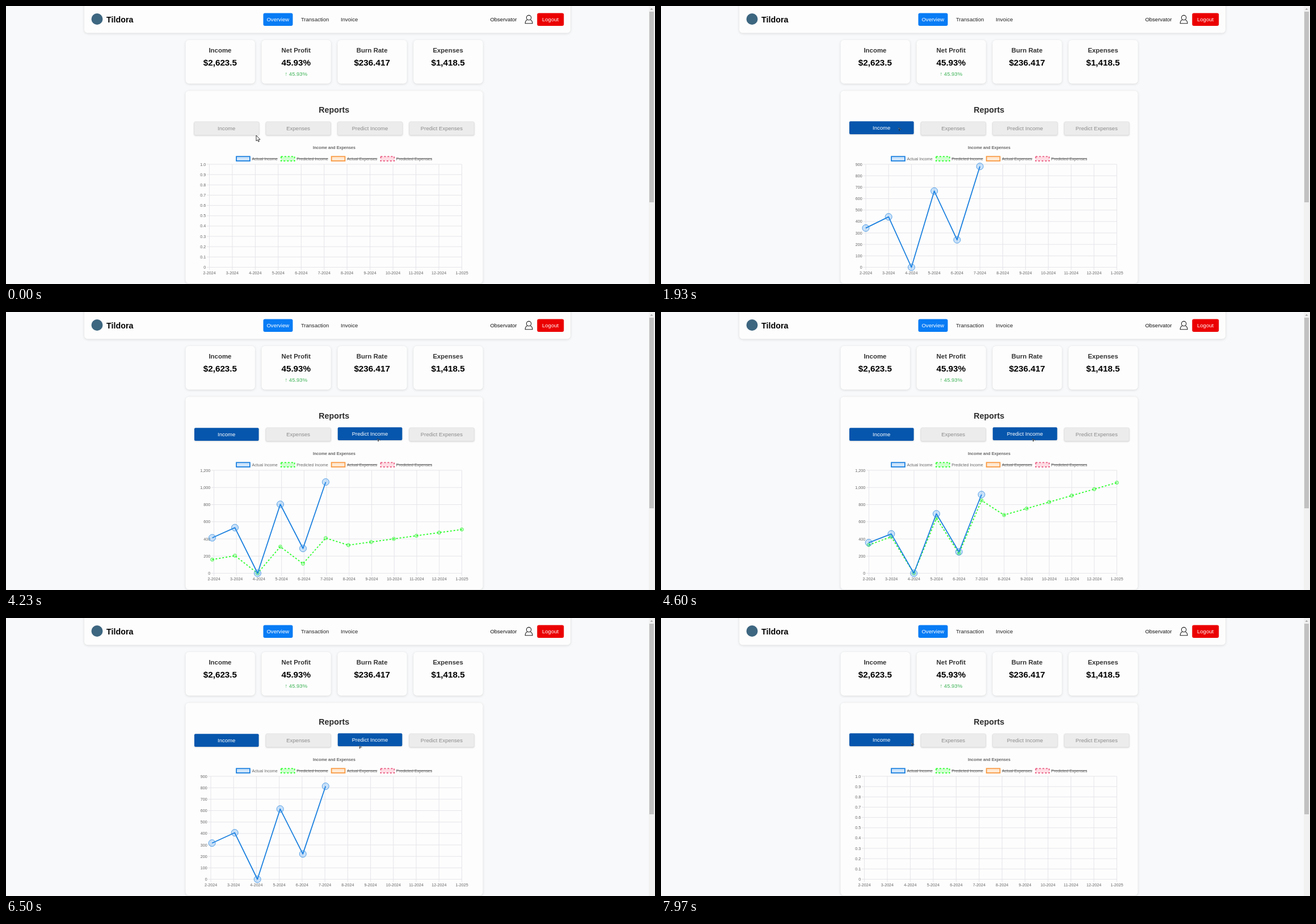
An HTML page that plays this animation: 1144x490 px, repeating every 8000 ms.

```html
<!DOCTYPE html>
<html lang="en">
<head>
<meta charset="utf-8">
<title>Finance overview</title>
<style>
html, body { margin: 0; width: 100%; height: 100%; overflow: hidden; background: #f8f9fa; }
svg { display: block; width: 1144px; height: 490px; font: 9.53px "Liberation Sans", Arial, sans-serif; }
.card { fill: #fdfdfd; filter: drop-shadow(0 1.5px 2px rgba(0, 0, 0, .13)); }
.mid { text-anchor: middle; }
.end { text-anchor: end; }
.bold { font-weight: bold; }
.small { font-size: 7.15px; fill: #666; }
.grid { stroke: #e5e5ea; fill: none; }
.btn { filter: drop-shadow(0 1.2px 1.2px rgba(0, 0, 0, .16)); }
</style>
</head>
<body>
<svg viewBox="0 0 1144 490">
  <rect class="card" x="138" y="-10" width="857" height="57.5" rx="6"/>
  <circle cx="160.5" cy="23" r="10" fill="#3d6680"/>
  <text class="bold" x="177" y="28.5" font-size="14.3">Tildora</text>
  <rect x="453.5" y="12.5" width="52" height="22.5" rx="3" fill="#087cf5"/>
  <text class="mid" x="479.3" y="27" fill="#fff">Overview</text>
  <text class="mid" x="544.6" y="27" fill="#222">Transaction</text>
  <text class="mid" x="605.2" y="27" fill="#222">Invoice</text>
  <text class="end" x="900.5" y="27" fill="#111">Observator</text>
  <g fill="none" stroke="#222" stroke-width="1.1">
    <circle cx="921.6" cy="20.6" r="4.2"/>
    <path d="M918.8 24.2Q915.2 26 915.2 30.7H928Q928 26 924.4 24.2"/>
  </g>
  <rect x="936.3" y="12.5" width="47" height="22.5" rx="3" fill="#eb0000"/>
  <text class="mid" x="959.6" y="27" fill="#fff">Logout</text>
  <g id="cards"></g>
  <rect class="card" x="316.5" y="149.5" width="524" height="339.5" rx="6"/>
  <text class="mid bold" x="578.3" y="188" font-size="14.3" fill="#2b2b2b">Reports</text>
  <text class="mid bold small" x="578.5" y="251.8">Income and Expenses</text>
  <g id="buttons"></g>
  <g id="legend"></g>
  <g id="chart"></g>
  <rect x="1133" width="11" height="490" fill="#f1f1f1"/>
  <rect x="1134" y="10" width="8" height="336" fill="#c1c1c1"/>
  <path d="M1135.5 6.5L1138 4L1140.5 6.5Z" fill="#999"/>
  <g id="cursor" fill="#fff" stroke="#222" stroke-width=".9" stroke-linejoin="round">
    <path id="arrow" d="M0 0V10L2.3 7.9L3.9 11.3L5.4 10.6L3.9 7.3H7Z"/>
    <path id="hand" d="M-1.1 1Q0-.7 1.1 1V5.2Q2-.1+4.8 3.2 5.6Q4.3 5 5 6.2Q6.3 5.7 6.3 7.4V10Q6.2 12 5 13.6H-.8Q-1.5 11.7-3.6 9.2Q-4.2 7.7-2.8 7.7L-1.1 9Z"/>
  </g>
</svg>
<script>
const LOOP = 8000, TOP = 279, BOTTOM = 460.5, RIGHT = 803.5, GROW = 1000, FADE = 200;
const $ = id => document.getElementById(id);
const lerp = (a, b, k) => a + (b - a) * k;
const clamp = v => Math.max(0, Math.min(1, v));

const actual = [350, 450, 0, 680, 245, 900];
const predicted = [...actual, 720, 800, 880, 960, 1040, 1120];
const months = predicted.map((_, i) => i < 11 ? `${i + 2}-2024` : '1-2025');

// Chart layouts, each starting with a click
const views = [
  { at: 0, left: 358.5, max: 1, rows: 10 },
  { at: 1310, left: 361, max: 900, rows: 9, income: true },
  { at: 4090, left: 366.5, max: 1200, rows: 6, income: true, forecast: true },
  { at: 6290, left: 361, max: 900, rows: 9, income: true },
  { at: 7700, left: 358.5, max: 1, rows: 10 }
];
const viewIndex = t => Math.max(0, views.findLastIndex(v => v.at <= t));

// Pointer stops: time, x, y
const stops = [
  [450, 441, 228], [950, 419, 214.5], [2050, 419, 214.5], [2700, 494.5, 179],
  [3250, 494.5, 179], [3850, 655, 223], [5700, 655, 223], [6150, 622.5, 225],
  [6700, 622.5, 225], [7400, 441.5, 220]
];
function pointer(t) {
  const i = stops.findIndex(s => s[0] > t);
  if (i === 0) return stops[0].slice(1);
  if (i < 0) return stops.at(-1).slice(1);
  const [t0, x0, y0] = stops[i - 1], [t1, x1, y1] = stops[i];
  let k = (t - t0) / (t1 - t0);
  k = k * k * (3 - 2 * k);
  return [lerp(x0, x1, k), lerp(y0, y1, k)];
}

const buttons = ['Income', 'Expenses', 'Predict Income', 'Predict Expenses']
  .map((label, i) => ({ label, x: 331.3 + 126.4 * i, key: ['income', '', 'forecast', ''][i] }));
function hovers(b, t) {
  const [x, y] = pointer(t);
  return x > b.x && x < b.x + 115 && y > 204 && y < 228;
}

// Share of the last FADE ms in which a condition held, as in a linear transition
function recent(test, t) {
  let n = 0;
  for (let i = 0; i < 10; i++) n += test(Math.max(0, t - FADE * i / 10)) ? 1 : 0;
  return n / 10;
}

function drawButtons(t) {
  $('buttons').innerHTML = buttons.map(b => {
    const lift = recent(u => hovers(b, u), t);
    const on = recent(u => hovers(b, u) || views[viewIndex(u)][b.key], t);
    const mid = b.x + 57.4;
    return `<g class="btn" transform="translate(0 ${-lift})">
      <g opacity="${1 - on}"><rect x="${b.x + .4}" y="204" width="114.4" height="23.6" rx="2.5" fill="#ececec" stroke="#dedede" stroke-width=".7"/>
      <text class="mid" x="${mid}" y="218.7" fill="#8c8c8c">${b.label}</text></g>
      <g opacity="${on}"><rect x="${b.x + .7}" y="204.2" width="113.6" height="22.8" rx="2" fill="#0656ad"/>
      <text class="mid" x="${mid}" y="218.7" fill="#fff">${b.label}</text></g></g>`;
  }).join('');
}

const legend = [
  ['Actual Income', 405.2, 478.7, '#1b80df', '#cfe5fb', 'income'],
  ['Predicted Income', 484, 567.7, '#2cff2c', '#cfffcf', 'forecast'],
  ['Actual Expenses', 572.8, 654.5, '#f99b45', '#ffe9d3', ''],
  ['Predicted Expenses', 659.6, 751, '#e8557c', '#ffdce4', '']
];
function drawLegend(view) {
  $('legend').innerHTML = legend.map(([label, x, end, stroke, fill, key], i) =>
    `<rect x="${x + .9}" y="265.3" width="23.8" height="7.8" fill="${fill}" stroke="${stroke}" stroke-width="1.8"${i % 2 ? ' stroke-dasharray="3"' : ''}/>
    <text class="small" x="${x + 28.2}" y="271.5">${label}</text>` +
    (view[key] ? '' : `<path d="M${x + 28.2} 269H${end}" stroke="#666" stroke-width="1.2"/>`)).join('');
}

const monthX = (left, i) => lerp(left, RIGHT, i / 11);
const valueY = (v, max) => lerp(BOTTOM, TOP, v / max);

function grid({ left, max, rows }) {
  let out = '';
  months.forEach((m, i) => {
    const x = monthX(left, i);
    out += `<path class="grid" d="M${x} ${TOP}V465.3"/><text class="small mid" x="${x}" y="473.2">${m}</text>`;
  });
  for (let i = 0; i <= rows; i++) {
    const y = lerp(BOTTOM, TOP, i / rows), v = max * i / rows;
    const label = i && max === 1 ? v.toFixed(1) : v.toLocaleString('en-US');
    out += `<path class="grid" d="M${left - 4.8} ${y}H${RIGHT}"/><text class="small end" x="${left - 6.3}" y="${y + 2.5}">${label}</text>`;
  }
  return out;
}

function series(data, key, view, before, k, line, dot) {
  if (!view[key]) return '';
  const points = data.map((v, i) => [
    lerp(monthX(before.left, i), monthX(view.left, i), k),
    lerp(before[key] ? valueY(v, before.max) : BOTTOM, valueY(v, view.max), k)
  ]);
  return `<polyline points="${points.join(' ')}" fill="none" stroke-width="1.8" stroke-linejoin="round" ${line}/>` +
    points.map(([x, y]) => `<circle cx="${x}" cy="${y}" ${dot}/>`).join('');
}

function drawChart(t) {
  const i = viewIndex(t), view = views[i], before = views[Math.max(0, i - 1)];
  const k = 1 - (1 - clamp((t - view.at) / GROW)) ** 4;
  drawLegend(view);
  $('chart').innerHTML = grid(view) +
    series(predicted, 'forecast', view, before, k, 'stroke="#2cff2c" stroke-dasharray="3"',
      'r="3" fill="#00ff00" fill-opacity=".22" stroke="#3df53d" stroke-width=".8"') +
    series(actual, 'income', view, before, k, 'stroke="#1b80df"',
      'r="6" fill="#1485f0" fill-opacity=".22" stroke="#4596e3" stroke-width=".9"');
}

function drawCursor(t) {
  const over = buttons.some(b => hovers(b, t));
  $('cursor').setAttribute('transform', `translate(${pointer(t)})`);
  $('arrow').style.display = over ? 'none' : '';
  $('hand').style.display = over ? '' : 'none';
}

$('cards').innerHTML = [
  ['Income', '$2,623.5'], ['Net Profit', '45.93%', '↑ 45.93%'],
  ['Burn Rate', '$236.417'], ['Expenses', '$1,418.5']
].map(([name, value, change = ''], i) => {
  const x = 316.7 + 133.9 * i, mid = x + 60.7;
  return `<rect class="card" x="${x}" y="60" width="122.2" height="76.8" rx="6"/>
    <text class="mid bold" x="${mid}" y="82" font-size="11.44" fill="#333">${name}</text>
    <text class="mid bold" x="${mid}" y="105" font-size="15.25">${value}</text>
    <text class="mid" x="${mid}" y="122.6" fill="#3db356">${change}</text>`;
}).join('');

const start = performance.now();
function frame() {
  const t = (performance.now() - start) % LOOP;
  drawButtons(t);
  drawChart(t);
  drawCursor(t);
  requestAnimationFrame(frame);
}
frame();
</script>
</body>
</html>
```
